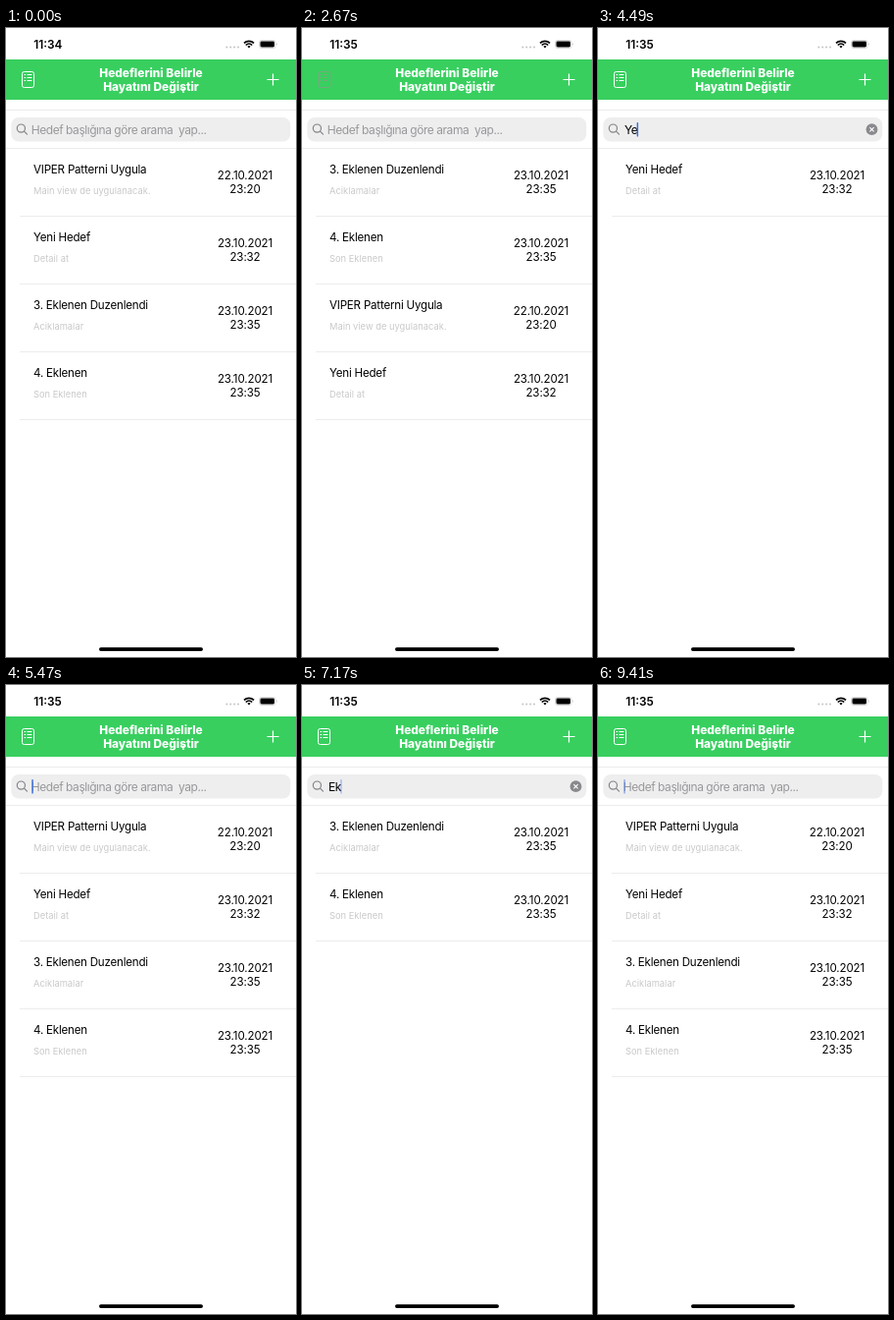
An HTML page that plays this animation: 296x640 px, repeating every 9.49 s.

```html
<!DOCTYPE html>
<html lang="tr">
<head>
<meta charset="utf-8">
<title>Hedefler</title>
<style>
  html, body { margin: 0; width: 100%; height: 100%; overflow: hidden; background: #fff; }
  svg { display: block; width: 296px; height: 640px; font-family: Inter, Roboto, sans-serif; }
  text { white-space: pre; }
  .clock { font-size: 11.9px; font-weight: 600; }
  .title { font-size: 11.9px; font-weight: 800; fill: #fff; text-anchor: middle; }
  .field { font-size: 12px; letter-spacing: -.46px; }
  .name { font-size: 11.6px; letter-spacing: -.22px; }
  .date { font-size: 11.6px; letter-spacing: -.14px; text-anchor: middle; }
  .note { font-size: 9.35px; fill: #c9c9c9; }
  .line { stroke: #ececec; }
</style>
</head>
<body>
<svg viewBox="0 0 296 640">
  <text id="clock" class="clock" x="28.2" y="21"></text>
  <g fill="#c4c4c4">
    <circle cx="225.3" cy="19.5" r="1"/><circle cx="229.2" cy="19.5" r="1"/>
    <circle cx="233.1" cy="19.5" r="1"/><circle cx="237" cy="19.5" r="1"/>
  </g>
  <g fill="none" stroke="#000" stroke-width="1.7">
    <path d="M243 15.4a7 7 0 0 1 10 0M244.8 17.5a4.6 4.6 0 0 1 6.4 0"/>
    <path d="M246.4 18.8l1.6 1.8 1.6-1.8a2.4 2.4 0 0 0-3.2 0z" fill="#000" stroke="none"/>
  </g>
  <rect x="258.5" y="12.5" width="16.5" height="8" rx="2.3" fill="none" stroke="#cfcfcf" stroke-width=".8"/>
  <rect x="259.5" y="13.5" width="14.5" height="6" rx="1.4"/>
  <path d="M276 15.1q1.2 1.4 0 2.8z" fill="#b5b5b5"/>

  <rect y="32" width="296" height="41" fill="#38cf5f"/>
  <g id="sort" fill="none" stroke="#fff">
    <rect x="16.5" y="44.5" width="12" height="16" rx="2"/>
    <path d="M18.6 47.5h1.4M18.6 50.5h1.4M18.6 53.5h1.4M21.4 47.5h5M21.4 50.5h5M21.4 53.5h5"/>
  </g>
  <text class="title" x="148" y="50">Hedeflerini Belirle</text>
  <text class="title" x="148" y="64">Hayatını Değiştir</text>
  <path d="M266.5 52.5h12M272.5 46.5v12" stroke="#fff" stroke-width="1.2"/>

  <path class="line" d="M0 83.5h296M0 122.5h296"/>
  <rect x="5.3" y="91" width="285" height="24.4" rx="7.5" fill="#eeeeef"/>
  <g fill="none" stroke="#85858a" stroke-width="1.2" stroke-linecap="round">
    <circle cx="15.4" cy="102.1" r="4.1"/><path d="M18.5 105.2l3 3"/>
  </g>
  <text id="hint" class="field" x="25.8" y="107.5" fill="#98989c">Hedef başlığına göre arama  yap...</text>
  <text id="query" class="field" x="27" y="107.5"></text>
  <rect id="caret" y="96" width="1.5" height="14.6" rx=".7" fill="#3f70dc"/>
  <g id="clear">
    <circle cx="279.5" cy="103.2" r="5.9" fill="#8a8a8e"/>
    <path d="M277.4 101.1l4.2 4.2M281.6 101.1l-4.2 4.2" stroke="#fff" stroke-width="1.1"/>
  </g>

  <g id="list"></g>
  <rect x="95" y="630.2" width="106" height="3.8" rx="1.9"/>
</svg>
<script>
const LOOP = 9490, ROW = 69;
const $ = id => document.getElementById(id);

const goals = [
  ['VIPER Patterni Uygula', 'Main view de uygulanacak.', '22.10.2021', '23:20'],
  ['Yeni Hedef', 'Detail at', '23.10.2021', '23:32'],
  ['3. Eklenen Duzenlendi', 'Aciklamalar', '23.10.2021', '23:35'],
  ['4. Eklenen', 'Son Eklenen', '23.10.2021', '23:35']
].map(([name, note, day, time]) => {
  const el = document.createElementNS('http://www.w3.org/2000/svg', 'g');
  el.innerHTML = `<text class="name" x="28" y="147.8">${name}</text>
    <text class="note" x="28" y="168.6">${note}</text>
    <text class="date" x="244" y="154.2">${day}</text>
    <text class="date" x="244" y="168.2">${time}</text>
    <path class="line" d="M14 191.5h282"/>`;
  $('list').append(el);
  return { name, el };
});

// Each step changes only the listed parts of the state.
const steps = [
  [0, { clock: '11:34', pressed: false, sorted: false, query: '', caret: 0 }],
  [360, { clock: '11:35' }],
  [1870, { pressed: true }],
  [2670, { sorted: true }],
  [3340, { pressed: false, sorted: false }],
  [4060, { caret: .5 }],
  [4220, { caret: 1 }],
  [4490, { query: 'Ye' }],
  [4610, { query: 'Yen' }],
  [4720, { query: 'Yeni' }],
  [5020, { query: 'Yen' }],
  [5180, { query: 'Ye' }],
  [5330, { query: 'Y' }],
  [5470, { query: '' }],
  [6250, { caret: .35 }],
  [6360, { query: 'E', caret: 1 }],
  [6540, { query: 'Ek' }],
  [7170, { caret: .4 }],
  [7410, { query: '', caret: 1 }],
  [8070, { caret: 0 }],
  [8390, { caret: 1 }],
  [8930, { caret: .5 }],
  [9050, { caret: 0 }],
  [9290, { caret: .25 }],
  [9410, { caret: .55 }]
];

const show = (el, on) => el.setAttribute('visibility', on ? 'visible' : 'hidden');

function showList(query, sorted) {
  const found = goals.filter(g => g.name.toLowerCase().includes(query.toLowerCase()));
  if (sorted) found.sort((a, b) => a.name < b.name ? -1 : 1);
  for (const g of goals) {
    const i = found.indexOf(g);
    show(g.el, i >= 0);
    g.el.setAttribute('transform', `translate(0 ${Math.max(i, 0) * ROW})`);
  }
}

function render({ clock, pressed, sorted, query, caret }) {
  $('clock').textContent = clock;
  $('sort').setAttribute('stroke', pressed ? '#74a97b' : '#fff');
  $('query').textContent = query;
  show($('hint'), !query);
  show($('clear'), query);
  const width = query ? $('query').getComputedTextLength() : 0;
  $('caret').setAttribute('x', 26.3 + width);
  $('caret').setAttribute('opacity', caret);
  showList(query, sorted);
}

const start = performance.now();
let shown = -1;

function tick() {
  const t = (performance.now() - start) % LOOP;
  const past = steps.filter(([at]) => at <= t);
  if (past.length !== shown) {
    shown = past.length;
    render(Object.assign({}, ...past.map(([, change]) => change)));
  }
  requestAnimationFrame(tick);
}
tick();
</script>
</body>
</html>
```
